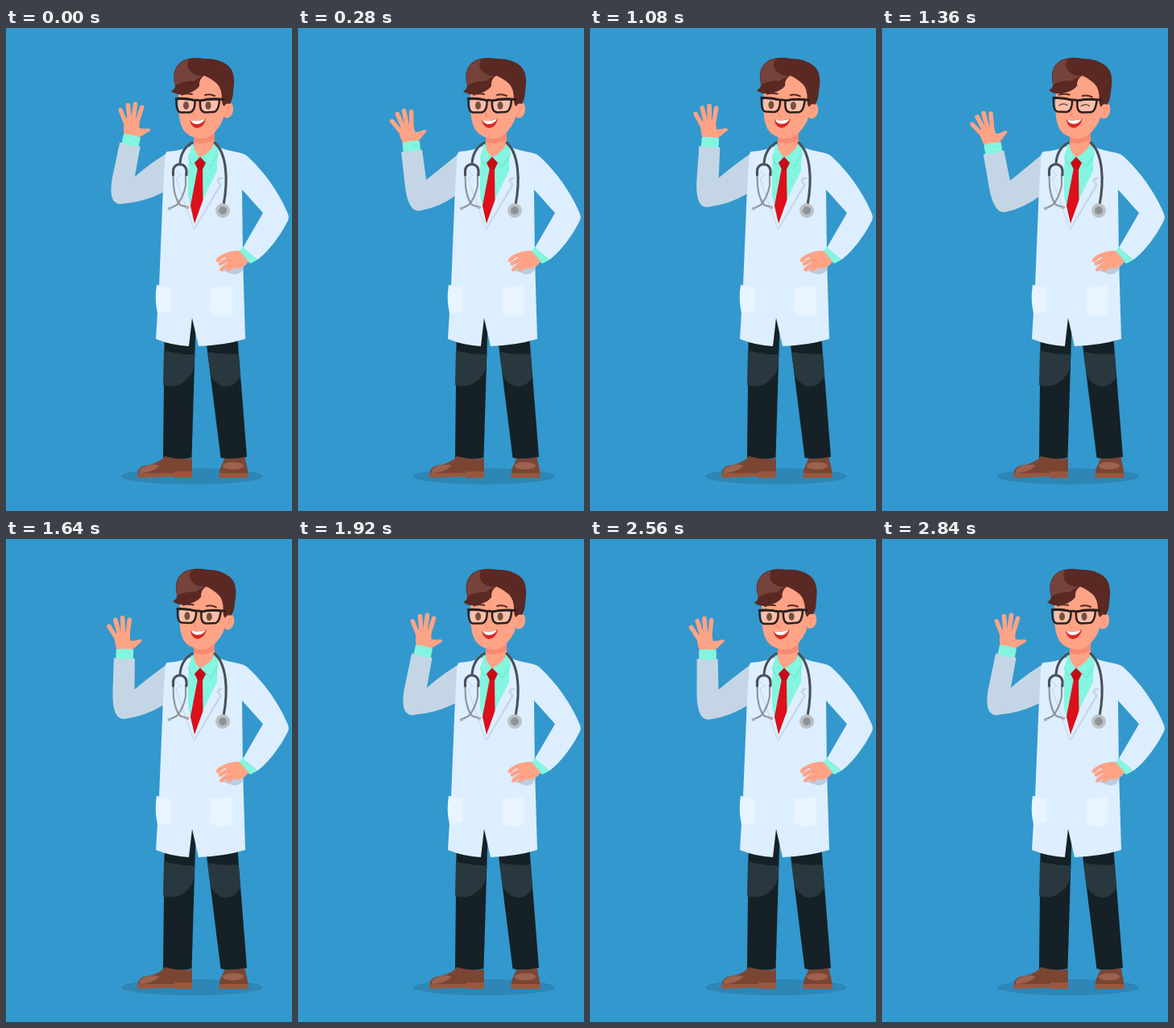
An HTML page with a canvas for the animation above (2880 ms loop, 355 by 598 pixels).

```html
<!DOCTYPE html>
<html lang="en">
<head>
<meta charset="utf-8">
<title>Waving doctor</title>
<style>
html, body { margin: 0; width: 100%; height: 100%; overflow: hidden; background: #3398cd; }
canvas { display: block; width: 355px; height: 598px; }
</style>
</head>
<body>
<canvas id="stage"></canvas>
<script>
const W = 355, H = 598, LOOP = 2880, STEP = 40, WAVE = 960;
const canvas = document.getElementById('stage');
const ctx = canvas.getContext('2d');
const dpr = window.devicePixelRatio || 1;
canvas.width = W * dpr;
canvas.height = H * dpr;

const C = {
  sky: '#3398cd', shadow: '#2d86b6', coat: '#ddeeff', pocket: '#e8f4ff', fold: '#c3d5e6',
  sleeve: '#c4d6e5', teal: '#84f6df', tealDark: '#5cdcc6', skin: '#ffa386', skinDark: '#f78a72',
  hair: '#5a2923', hairLight: '#76433b', frame: '#2a211f', iris: '#74503f',
  pants: '#152126', knee: '#29383f', shoe: '#7b4534', shoeLight: '#9c614f', sole: '#97583f',
  tie: '#dc0f1b', knot: '#c50c18', tube: '#4a5058', metal: '#8d9499'
};

const clamp = x => Math.max(0, Math.min(1, x));
const lerp = (a, b, p) => a + (b - a) * p;
const ramp = (t, from, to) => clamp((t - from) / (to - from));

function fill(d, color) {
  ctx.fillStyle = color;
  ctx.fill(new Path2D(d));
}
function line(d, color, width) {
  ctx.strokeStyle = color;
  ctx.lineWidth = width;
  ctx.stroke(new Path2D(d));
}
function oval(x, y, rx, ry, color, turn = 0) {
  ctx.fillStyle = color;
  ctx.beginPath();
  ctx.ellipse(x, y, rx, ry, turn, 0, Math.PI * 2);
  ctx.fill();
}

// 0 = hand raised inward, 1 = hand swung outward
function wavePose(t) {
  const u = t % WAVE;
  return ramp(u, 0, 360) - ramp(u, 360, 920);
}

function headTilt(t) {
  return 1.8 * ramp(t, 570, 920) - 4.1 * ramp(t, 1680, 2280) + 2.3 * ramp(t, 2280, 2840);
}

function eyeOpen(t) {
  const u = t < 1800 ? Math.abs(t % WAVE - 400) : LOOP;
  return clamp((u - 50) / 70);
}

function legs() {
  oval(231, 555, 88, 10, C.shadow);
  fill('M197 350H236L234.500 400L230.500 532Q213 536 195 532Z', C.pants);
  fill('M247.500 380L287.500 385L299 531Q282 536 266.500 532Z', C.pants);
  fill('M196 399Q215 405 234.500 404L233 421C228 437 213 447 195 442Z', C.knee);
  fill('M250 401Q269 405 288.500 403L291 432C281 449 263 447 254 430Z', C.knee);

  fill('M164 552Q163 545 171 542C184 540 193 536 197 530Q213 535 231 533V554H210L208 552Z', C.shoe);
  fill('M166 547C173 540 183 540 190 541Q187 549 166 551Z', C.shoeLight);
  fill('M163 551H208L210 549H231V557H210L207 555.5L164 557Z', C.sole);
  fill('M265 552C264 545 269 541 271 533Q283 534 297 531C297 541 301 543 300 553Z', C.shoe);
  oval(282, 542, 13, 4.5, C.shoeLight);
  fill('M264.500 551H300.500V557H264.500Z', C.sole);
}

function wavingArm(p) {
  const ex = lerp(144.3, 150.6, p), ey = lerp(199.3, 209.6, p);
  const turn = lerp(12, -11.5, p) * Math.PI / 180;
  const at = (x, y) => [
    ex + x * Math.cos(turn) - y * Math.sin(turn),
    ey + x * Math.sin(turn) + y * Math.cos(turn)
  ];

  ctx.save();
  ctx.translate(ex, ey);
  ctx.rotate(turn);
  line('M-22.300 -95L-11 -78', C.skin, 5.4);
  line('M-14.600 -103L-8 -82', C.skin, 5.6);
  line('M-6 -106L-4 -82', C.skin, 5.6);
  line('M2.800 -104L0.500 -80', C.skin, 5.4);
  fill('M-15 -85Q-8 -91 3 -88L5 -78Q11 -78 16 -80Q20 -80 18.500 -77C14 -74 11 -69 7 -67L6 -62H-10L-13 -70Q-15 -76 -15 -85Z', C.skin);
  fill('M-12.500 -67Q-2 -69 9 -67L9 -54H-12.500Z', C.teal);
  line('M2 -63L5 -61', C.tealDark, 0.8);
  ctx.restore();

  // Sleeve: the elbow follows the forearm, the other end stays under the coat.
  ctx.beginPath();
  ctx.moveTo(...at(-15, -56));
  ctx.quadraticCurveTo(...at(-2, -54), ...at(11, -56));
  ctx.lineTo(...at(12, -18));
  ctx.quadraticCurveTo(182, lerp(165, 171, p), 201, 154.5);
  ctx.lineTo(215, 180);
  ctx.lineTo(196, lerp(203, 208.5, p));
  ctx.quadraticCurveTo(lerp(171, 176, p), lerp(216, 224, p), ...at(1, 19));
  ctx.bezierCurveTo(...at(-9, 20), ...at(-15, 10), ...at(-15, -16));
  ctx.closePath();
  ctx.fillStyle = C.sleeve;
  ctx.fill();
}

function coat() {
  fill('M230 146Q217 152 200 153Q197 154 197 165L194.500 210L190 320L186 385Q206 393 227 394L231 359L239 394Q270 393 297 385L294 285L293 200L319 229L294 272L312 287C326 277 342 255 350 238Q352 234 349 228C338 202 320 178 303 162Q297 155 288 154Q275 152 262 147Z', C.coat);
  fill('M187 318Q196 321 205 321L205 350Q196 354 188 353Q184 336 187 318Z', C.pocket);
  fill('M254 321Q268 321 281 319L281 353Q275 357 267 357Q259 356 253 352Z', C.pocket);

  fill('M230 144L226 170L226 208L234 241L245 211L262 177L263 147Z', C.teal);
  fill('M233 125H259V147Q251 157 241 161Q234 156 233 148Z', C.skin);
  fill('M233 135Q246 141 259 130V138Q246 146 233 141Z', C.skinDark);
  fill('M232 144L226 159L231 170L241 160Q234 154 232 144Z', C.teal);
  fill('M259 143Q253 155 241 160L254 172L264 156Z', C.teal);
  line('M226.500 160L231 170L240 161M242 161L254 172L263 157', C.tealDark, 0.8);
  fill('M238 173H244L244.500 213L234 242L229 220Z', C.tie);
  fill('M234 167L241 159.500L248 167L244 175H238Z', C.knot);

  line('M211 177L217 182L211 186L233 249', C.fold, 1);
  fill('M264 185L271 185L264 189L268 194L234 250L234 247L265 194L261 189Z', C.fold);
}

function stethoscope() {
  line('M223 181L223 195Q220 210 212 219L204 223M207.500 181L208 196Q210 212 216 219L225 222', C.metal, 2.1);
  oval(203, 223.500, 2.3, 1.9, '#a9afb2');
  oval(225, 222, 2.3, 1.9, '#a9afb2');
  line('M231 142Q217 150 216 168M207.500 182V177C207.500 166 224 166 224 177V182', C.tube, 3.1);
  line('M259 142C274 155 276 188 270 219', C.tube, 3.1);
  oval(269, 226, 9, 9, '#bcc1c2');
  oval(269, 226, 5, 5, C.metal);
}

function hipHand() {
  fill('M265 299L282 305Q292 306 295 296L284 287Z', '#b9cde0');
  fill('M293.500 271L312 287L303.500 291.500Q294 287 288.500 279Z', C.teal);
  fill('M290 276Q297 284 301 289Q296 297 288 298Q280 296 276 291L271 281Q281 275 290 276Z', C.skin);
  line('M279 279Q269 281 263 287.500M281 285Q272 287 266 292M282 290Q273 293 267.500 299M287 293Q280 296 276 299', C.skin, 4.8);
  line('M279 287.500L270 291.500M281 293L273 297', C.skinDark, 0.8);
}

function eye(x, open, lens) {
  ctx.save();
  ctx.globalAlpha = 0.3;
  fill(lens, '#ffffff');
  ctx.restore();
  if (open > 0.15) {
    oval(x, 96, 3.5, 5 * open, C.iris);
  } else {
    line(`M${x - 5} 96.500Q${x} 93 ${x + 5} 96`, C.iris, 1.6);
  }
  line(lens, C.frame, 2.5);
}

function head(tilt, open) {
  ctx.save();
  ctx.translate(246, 140);
  ctx.rotate(tilt * Math.PI / 180);
  ctx.translate(-246, -140);

  oval(275, 101.500, 7, 10, C.skin, 0.2);
  line('M273 99Q277 97 279 99M273 105Q276 103 276 101', C.skinDark, 1);
  fill('M214 75L238 58H268L272 100Q271 116 260 128Q252 136 240 136Q227 136 220 126Q214 116 214 96Z', C.skin);

  fill('M205 78Q210 76 210 71C207 61 208 51 214 45C221 37 235 36 246 38Q263 37 275 46C284 53 284 66 282 78Q282 87 278 94Q273 92 271 97Q268 96 268 88Q268 75 262 69Q254 62 246 59Q239 63 240 72Q234 80 220 82Q210 83 205 78Z', C.hair);
  fill('M210 71C208 60 209 50 215 45Q220 40 227 39Q222 48 230 55Q236 60 245 59Q239 61 233 66Q222 65 210 71Z', C.hairLight);

  const drop = 1 - open;
  line(`M218 ${82.500 + drop}Q224 ${80.500 + drop} 231 ${82 + drop}M247 ${83 + drop}Q253 ${81 + drop} 259 ${84 + drop}`, C.hair, 2);
  eye(223.500, open, 'M211.500 88Q222 87 234.500 89.500Q235 104 227 104.500H217Q211 104 211.500 88Z');
  eye(251, open, 'M241 90Q253 87.500 265 88.500Q264 104 257 104L247 104.500Q240 104 241 90Z');
  line('M211 87.500Q223 86.500 234 89.500Q237 88.500 241 90Q253 87 265 88L270 88.500', C.frame, 2.8);

  line('M233 105Q232 109 236 110', C.skinDark, 1.6);
  fill('M228 114Q238 116 248 112Q246 123 237 124Q230 123 228 114Z', '#d92a24');
  fill('M229 114Q238 116 247 112.500Q244 119 237 119Q231 119 229 114Z', '#ffffff');
  ctx.restore();
}

function draw(t) {
  ctx.setTransform(dpr, 0, 0, dpr, 0, 0);
  ctx.lineCap = ctx.lineJoin = 'round';
  ctx.fillStyle = C.sky;
  ctx.fillRect(0, 0, W, H);
  legs();
  wavingArm(wavePose(t));
  coat();
  stethoscope();
  hipHand();
  head(headTilt(t), eyeOpen(t));
}

const start = performance.now();
function tick() {
  const t = (performance.now() - start) % LOOP;
  draw(Math.floor(t / STEP) * STEP);
  requestAnimationFrame(tick);
}
tick();
</script>
</body>
</html>
```
